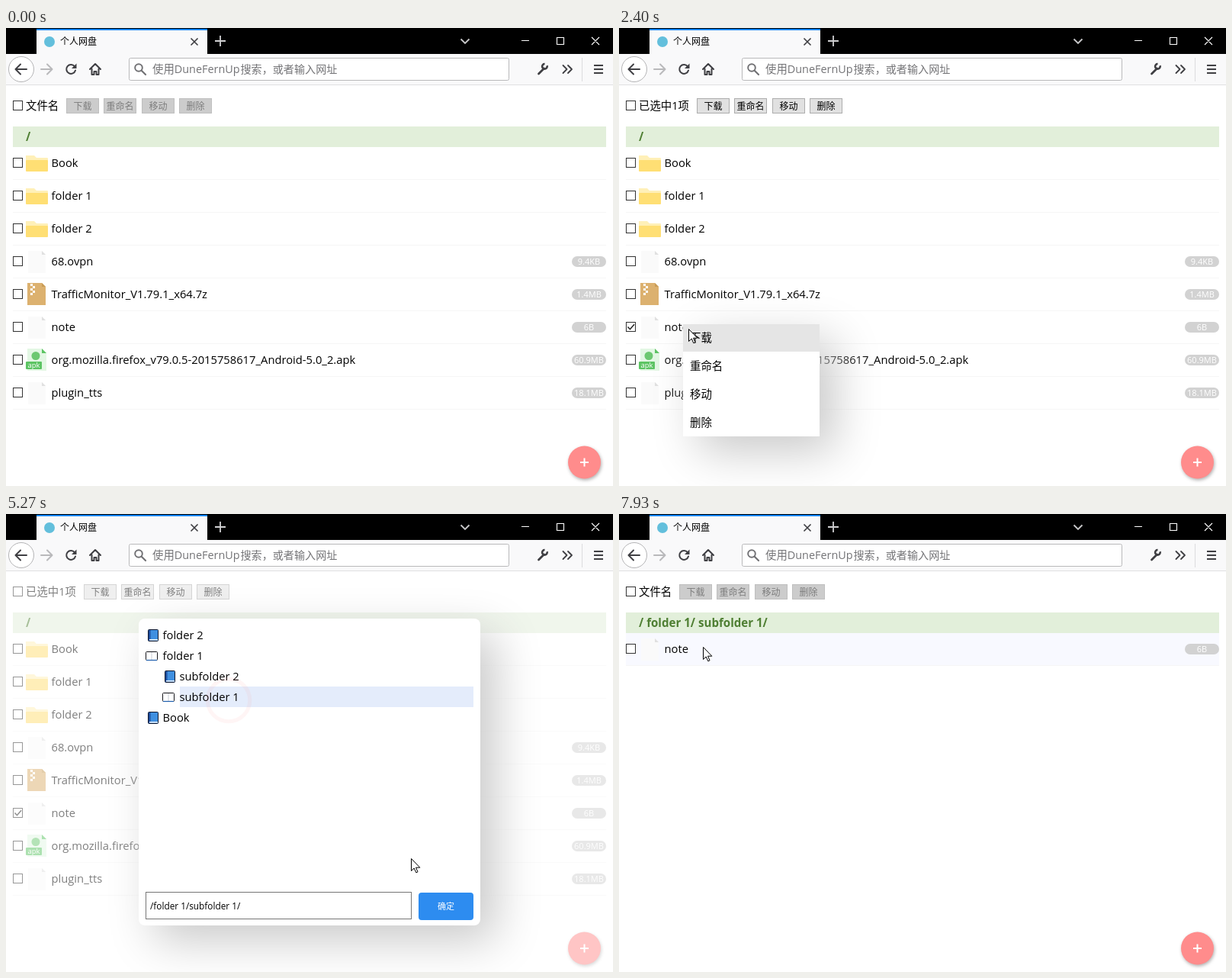
Recreate the animation shown at these times as an HTML page. Size 796 by 600 pixels, loop 8 s.

```html
<!DOCTYPE html>
<html lang="zh-CN">
<head>
<meta charset="utf-8">
<title>个人网盘</title>
<style>
html, body { margin: 0; width: 100%; height: 100%; overflow: hidden; background: #fff; }
svg, .layer { position: absolute; left: 0; top: 0; width: 796px; height: 600px; overflow: hidden; }
.panel { position: absolute; background: #fff; box-shadow: 20px 20px 60px #c9c9c9; }
text { font-family: 'Open Sans', 'Noto Sans CJK SC', 'Noto Sans CJK', sans-serif; white-space: pre; font-variant-ligatures: none; }
</style>
</head>
<body>
<script>
(() => {
const LOOP = 8000, STEP = 200 / 3, FADE = 180, RING = 360;
const NS = 'http://www.w3.org/2000/svg';

function el(parent, tag, attrs = {}, str) {
  const e = document.createElementNS(NS, tag);
  for (const k in attrs) e.setAttribute(k, attrs[k]);
  if (str) e.textContent = str;
  parent.appendChild(e);
  return e;
}
const group = p => el(p, 'g');
const stage = (p = document.body) => el(p, 'svg', { viewBox: '0 0 796 600' });
const box = (p, x, y, width, height, fill, more) => el(p, 'rect', { x, y, width, height, fill, ...more });
const disc = (p, cx, cy, r, fill, more) => el(p, 'circle', { cx, cy, r, fill, ...more });
const fillPath = (p, d, fill) => el(p, 'path', { d, fill });
const line = (p, d, stroke, width = 1, more) =>
  el(p, 'path', { d, stroke, 'stroke-width': width, fill: 'none', ...more });
const text = (p, x, y, str, size = 14.4, fill = '#000', more) =>
  el(p, 'text', { x, y, 'font-size': size, fill, ...more }, str);
const MID = { 'text-anchor': 'middle' };
const show = (e, on) => { e.style.display = on ? '' : 'none'; };

// Browser frame
function drawChrome(s) {
  box(s, 0, 0, 796, 34, '#000');
  box(s, 40, 1, 224, 33, '#f9f9fa');
  box(s, 40, 1, 224, 2, '#0a84ff');
  disc(s, 57, 18, 7, '#63bfdc');
  text(s, 71, 22, '个人网盘', 12);
  line(s, 'M242.5 13.5l9 9m0-9l-9 9', '#3c3c40', 1.6);
  line(s, 'M274 17h14m-7-7v14', '#d0d0d2', 1.8);
  line(s, 'M596.5 14.5l5.5 5.5l5.5-5.5', '#c8c8ca', 1.8);
  line(s, 'M676 16.5h10M722.5 12.5h9v9h-9zM768 12l10 10m0-10l-10 10', '#fff', 1.1);
  box(s, 0, 34, 796, 40, '#f9f9fa');
  box(s, 0, 74, 796, 1, '#e0e0e1');
  disc(s, 20, 54, 16.5, '#fff', { stroke: '#b4b4b6' });
  const ink = '#3f3f43', round = { 'stroke-linecap': 'round', 'stroke-linejoin': 'round' };
  line(s, 'M13 54h14M19 47.5l-6.5 6.5l6.5 6.5', ink, 2, round);
  line(s, 'M46 54h14M54 47.5l6.5 6.5l-6.5 6.5', '#b9b9bb', 2, round);
  line(s, 'M90 50.3A6 6 0 1 0 91 55.5', ink, 2, round);
  fillPath(s, 'M92.5 46.5v6.5h-6.5z', ink);
  line(s, 'M110 54l7-7l7 7M112.5 53.5v7.5h3v-4h3v4h3v-7.5', ink, 2, round);
  box(s, 161.5, 39.5, 498, 29, '#fff', { stroke: '#b9b9bb', rx: 2 });
  disc(s, 174, 52, 4.8, 'none', { stroke: '#737376', 'stroke-width': 2 });
  line(s, 'M177.7 55.7l5.3 5.3', '#737376', 2.2, round);
  text(s, 192, 59, '使用DuneFernUp', 14.4, '#737376');
  text(s, 307.5, 59, '搜索，或者输入网址', 14.1, '#737376');
  line(s, 'M698.5 60l7-7', ink, 2.8, round);
  line(s, 'M709.5 49.2a3.3 3.3 0 1 1-3-2.2', ink, 2.6);
  line(s, 'M730.5 49l5 5l-5 5m6.5-10l5 5l-5 5', ink, 1.8, round);
  box(s, 755, 39, 1, 31, '#dcdcde');
  for (const y of [48, 53, 58]) box(s, 771, y, 12, 2, ink);
}

function checkbox(p, y) {
  box(p, 9.5, y + .5, 12, 12, '#fff', { stroke: '#333' });
}

// Heading with its four buttons
function drawHead(p, label, dx, enabled) {
  text(p, 26, 107, label);
  ['下载', '重命名', '移动', '删除'].forEach((name, i) => {
    const x = Math.round(79 + dx + i * 49.4);
    box(p, x + .5, 92.5, 42, 19, enabled ? '#e1e1e1' : '#ccc', { stroke: enabled ? '#adadad' : '#bfbfbf' });
    text(p, x + 21.5, 106.5, name, 12, enabled ? '#000' : '#7d7d7d', MID);
  });
}

const icons = {
  dir(p, y) {
    fillPath(p, `M26 ${y + 11}h11l3 3h14q1 0 1 1v4h-29z`, '#fff0b8');
    box(p, 26, y + 17, 29, 15, '#ffdf74', { rx: 1 });
  },
  file(p, y) {
    fillPath(p, `M29 ${y + 7}h18l5 5v24h-23z`, '#fafafa');
    fillPath(p, `M47 ${y + 7}l5 5h-5z`, '#e0e0e0');
  },
  zip(p, y) {
    fillPath(p, `M28 ${y + 6}h19l5 5v24h-24z`, '#dcb16f');
    fillPath(p, `M47 ${y + 6}l5 5h-5z`, '#c99c57');
    for (let k = 0; k < 5; k++) box(p, 32 + k % 2 * 3, y + 7 + k * 3, 3, 3, '#fff');
  },
  apk(p, y) {
    fillPath(p, `M28 ${y + 6}h19l6 6v23h-25z`, '#e3f7e4');
    fillPath(p, `M47 ${y + 6}l6 6h-6z`, '#5cc463');
    disc(p, 39, y + 15.5, 5.5, '#6cc871');
    box(p, 26, y + 23, 21, 10, '#5cc463', { rx: 1 });
    text(p, 36.5, y + 31, 'apk', 9.5, '#fff', MID);
  }
};

function drawList(p, files) {
  files.forEach(([kind, name, size], i) => {
    const y = 156 + 43 * i;
    box(p, 9, y + 42, 778, 1, '#f6f6f6');
    checkbox(p, y + 14);
    icons[kind](p, y);
    text(p, 59.5, y + 26, name, 14.74);
    if (!size) return;
    box(p, 742, y + 14, 45, 14, '#d2d2d2', { rx: 7 });
    text(p, 764.5, y + 25, size, 11, '#fff', MID);
  });
}

const note = ['file', 'note', '6B'];
const root = [
  ['dir', 'Book'], ['dir', 'folder 1'], ['dir', 'folder 2'],
  ['file', '68.ovpn', '9.4KB'],
  ['zip', 'TrafficMonitor_V1.79.1_x64.7z', '1.4MB'],
  note,
  ['apk', 'org.mozilla.firefox_v79.0.5-2015758617_Android-5.0_2.apk', '60.9MB'],
  ['file', 'plugin_tts', '18.1MB']
];
// Each view: end time, breadcrumb, files
const views = [
  [5850, '/', root],
  [6630, '/', root.filter(f => f !== note)],
  [7430, '/ folder 1/', [['dir', 'subfolder 1'], ['dir', 'subfolder 2']]],
  [LOOP, '/ folder 1/ subfolder 1/', [note]]
];

drawChrome(stage());
const page = stage();
checkbox(page, 95);
const headPlain = group(page), headPicked = group(page);
drawHead(headPlain, '文件名', 0, false);
drawHead(headPicked, '已选中1项', 23, true);
box(page, 9, 129, 778, 27, '#e2efda');
const hover = box(page, 9, 156, 778, 43, '#f8f9ff');
const viewEls = views.map(([, path, files]) => {
  const g = group(page);
  text(g, 26, 148, path, 15.1, '#4f7f33', { 'font-weight': 700 });
  drawList(g, files);
  return g;
});
const tick = line(page, 'M11.5 391.5l3 3.2l5.5-6.5', '#222', 1.5);
const fab = disc(page, 758.5, 569, 21.5, '#ff8c8c');
fab.style.filter = 'drop-shadow(1px 2px 2px rgba(0,0,0,.3))';
line(page, 'M753 569h11m-5.5-5.5v11', '#fff', 2);

// Floating layers
function layer(x, y, w, h, radius = 0) {
  const d = document.createElement('div'), panel = document.createElement('div');
  d.className = 'layer';
  panel.className = 'panel';
  panel.style.cssText = `left:${x}px;top:${y}px;width:${w}px;height:${h}px;border-radius:${radius}px`;
  d.appendChild(panel);
  document.body.appendChild(d);
  return { d, s: stage(d) };
}
const ITEM = 36.75;
function menu(x, y, names) {
  const m = layer(x, y, 179, ITEM * names.length);
  m.mark = box(m.s, x, y, 179, 36, '#e5e5e5');
  names.forEach((n, i) => text(m.s, x + 9, y + 23.3 + ITEM * i, n));
  return m;
}
const addMenu = menu(309, 301.5, ['新建文件夹', '上传文件']);
const fileMenu = menu(84, 388, ['下载', '重命名', '移动', '删除']);
show(addMenu.mark, false);

const modal = layer(174, 137, 448, 402, 8), ms = modal.s;
function closedBook(p, x, y) {
  box(p, x + .5, y - 7.5, 13, 15, '#3f8fe0', { stroke: '#10172c', rx: 1 });
  box(p, x + 1, y - 7, 2.5, 14, '#1d4d9c');
  box(p, x + 2, y + 5, 11, 1.6, '#e8f1fb');
}
function openBook(p, x, y) {
  box(p, x - 2.5, y - 5.5, 15, 11, '#fff', { stroke: '#15151a', rx: 1 });
  line(p, `M${x + 5} ${y - 5}v10`, '#c8ccd4');
  line(p, `M${x - 2} ${y + 5.5}h14`, '#1f5fae', 1.2);
}
// Rows: label, depth, open
function drawTree(rows, chosen) {
  const g = group(ms);
  rows.forEach(([label, depth, open], i) => {
    const y = 159 + 27 * i, x = 206 + 22 * depth;
    if (i === chosen) box(g, x, y - 14, 613 - x, 27, '#e4ecfb');
    (open ? openBook : closedBook)(g, x - 20, y);
    text(g, x - .5, y + 5, label, 14.74);
  });
  return g;
}
const f1 = ['folder 1', 0], s1 = ['subfolder 1', 1], f2 = ['folder 2', 0], s2 = ['subfolder 2', 1], book = ['Book', 0];
const opened = r => [...r, true];
// Each tree state: end time, rows, chosen row, path
const trees = [
  [4000, [f2, f1, book], -1, '/'],
  [4960, [f2, opened(f1), s2, s1, book], 1, '/folder 1/'],
  [LOOP, [f2, opened(f1), s2, opened(s1), book], 3, '/folder 1/subfolder 1/']
];
box(ms, 183.5, 495.5, 348, 35, '#fff', { stroke: '#767676' });
box(ms, 541, 496, 72, 36, '#2d8cf0', { rx: 4 });
text(ms, 577, 518, '确定', 11, '#fff', MID);
const treeEls = trees.map(([, rows, chosen, path]) => {
  const g = drawTree(rows, chosen);
  text(g, 189, 518, path, path === '/' ? 14 : 11.8);
  return g;
});

const overlay = stage();
const ring = disc(overlay, 0, 0, 5, 'none', { stroke: '#fa8b8b', 'stroke-width': 5 });
const arrow = el(overlay, 'path', {
  d: 'M.5 .5V16.5L4.2 13L6.8 18.8L9 17.8L6.5 12.2H11.8Z', fill: '#fff', stroke: '#000'
});

// Pointer: time, x, y
const moves = [
  [67, 772, 612], [400, 757, 572], [620, 757, 572], [1150, 393, 252], [1350, 393, 252],
  [1467, 282, 317], [1700, 84, 386], [1800, 77, 388], [1867, 91, 394], [2410, 91, 394],
  [2490, 110, 478], [2900, 110, 478], [3333, 235, 397], [3780, 262, 182], [4250, 262, 182],
  [4700, 292, 244], [5020, 292, 244], [5267, 531, 451], [5560, 576, 510], [5830, 576, 510],
  [6067, 276, 360], [6400, 100, 216], [6740, 100, 216], [7050, 112, 182], [7790, 112, 182],
  [7933, 110, 174]
];
const clicks = [[450, 757, 572], [1340, 393, 252], [2500, 110, 478], [3930, 262, 182],
  [4925, 292, 244], [5780, 576, 510], [6560, 100, 216], [7350, 112, 182]];

function pointer(t) {
  const n = moves.findIndex(m => m[0] > t);
  if (n === 0) return moves[0].slice(1);
  if (n < 0) return moves[moves.length - 1].slice(1);
  const a = moves[n - 1], b = moves[n], k = (t - a[0]) / (b[0] - a[0]);
  return [a[1] + (b[1] - a[1]) * k, a[2] + (b[2] - a[2]) * k];
}
const ramp = (t, from) => Math.max(0, Math.min(1, (t - from) / FADE));
const between = (t, from, to) => ramp(t, from) - ramp(t, to);
const pick = (list, t) => list.findIndex(v => t < v[0]);
const fade = (l, k) => { l.d.style.opacity = k; show(l.d, k > 0); };

function render(now) {
  const t = Math.floor((now % LOOP + 5) / STEP) * STEP % LOOP;
  const [x, y] = pointer(t);
  const add = between(t, 480, 1325), ask = between(t, 2900, 5800);
  page.style.opacity = 1 - .5 * Math.max(add, ask);
  fade(addMenu, add);
  fade(fileMenu, between(t, 2000, 2520));
  fade(modal, ask);
  fileMenu.mark.setAttribute('y', 388 + ITEM * Math.max(0, Math.min(3, Math.floor((y - 388) / ITEM))));

  const picked = t >= 2060 && t < 5850;
  show(headPlain, !picked);
  show(headPicked, picked);
  show(tick, picked);

  const v = pick(views, t), tr = pick(trees, t);
  viewEls.forEach((g, i) => show(g, i === v));
  treeEls.forEach((g, i) => show(g, i === tr));
  // Row highlight trails the pointer a little
  const row = Math.floor((pointer(t - 100)[1] - 156) / 43);
  show(hover, t > 5850 && row >= 0 && row < views[v][2].length);
  hover.setAttribute('y', 156 + 43 * row);

  const c = clicks.find(k => t >= k[0] && t < k[0] + RING);
  show(ring, c);
  if (c) {
    const p = (t - c[0]) / RING;
    ring.setAttribute('cx', c[1]);
    ring.setAttribute('cy', c[2]);
    ring.setAttribute('r', 5 + 24 * p);
    ring.setAttribute('opacity', Math.min(1, (1 - p) / .6));
  }
  arrow.setAttribute('transform', `translate(${Math.round(x)} ${Math.round(y)})`);
}

const start = performance.now();
function loop() {
  render(performance.now() - start);
  requestAnimationFrame(loop);
}
loop();
})();
</script>
</body>
</html>
```
